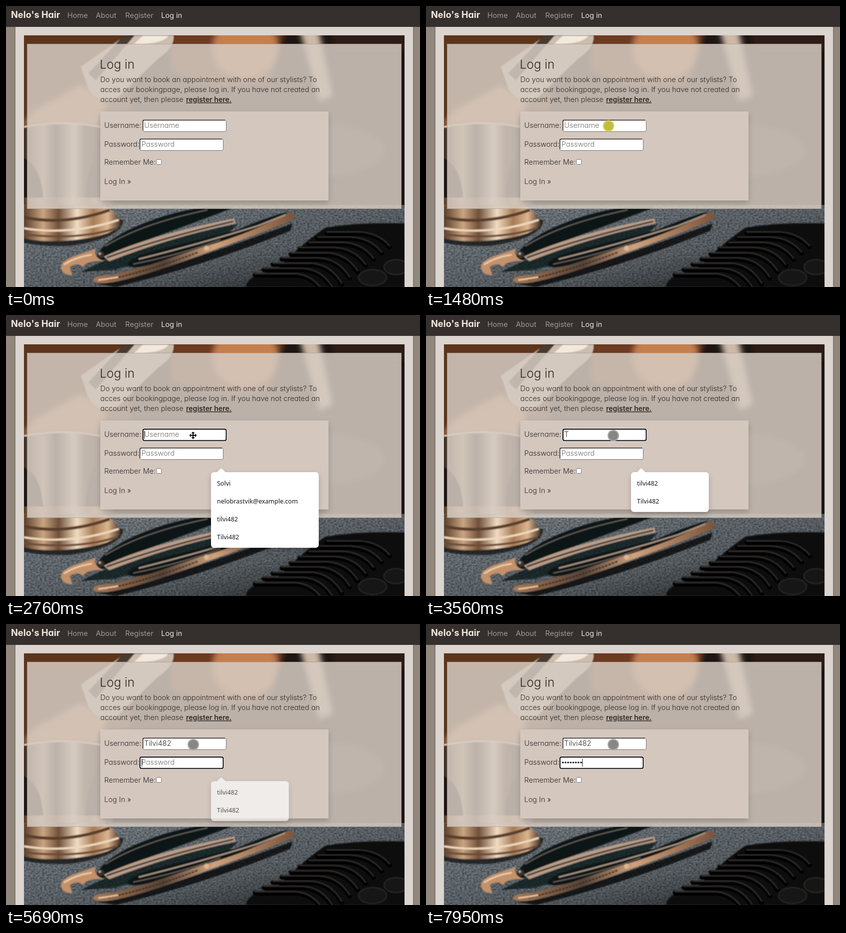
An HTML page for the animation above (8 s loop, 830 by 565 pixels).

```html
<!DOCTYPE html>
<html lang="en">
<head>
<meta charset="utf-8">
<title>Log in</title>
<style>
html, body { margin: 0; width: 100%; height: 100%; overflow: hidden; background: #91877c; }
svg { display: block; width: 100%; height: 100%; }
text { font: 300 14.5px Inter, "Open Sans", sans-serif; font-feature-settings: "cv11"; fill: #2f2926; white-space: pre; }
.nav { font-weight: 400; font-size: 14.6px; fill: #a09995; }
.nav.active { fill: #eee6e0; }
.brand { font-weight: 700; font-size: 18.2px; fill: #f1e8e1; }
.title { font-size: 24.4px; }
.link { font-weight: 600; font-size: 14.1px; text-decoration: underline; }
.hint { fill: #756d69; }
.popup text { font: 400 12.5px "Noto Sans", "Open Sans", sans-serif; fill: #15151f; }
</style>
</head>
<body>
<svg viewBox="0 0 830 565" preserveAspectRatio="none">
  <defs>
    <clipPath id="photoClip"><rect x="36" y="59" width="763" height="506"/></clipPath>
    <filter id="soft" x="-20%" y="-20%" width="140%" height="140%"><feGaussianBlur stdDeviation="6"/></filter>
    <filter id="slight" x="-10%" y="-10%" width="120%" height="120%"><feGaussianBlur stdDeviation="0.8"/></filter>
    <filter id="shadow" x="-10%" y="-10%" width="120%" height="130%">
      <feDropShadow dx="0" dy="5" stdDeviation="6" flood-color="#000" flood-opacity=".2"/>
    </filter>
    <filter id="towel" x="0" y="0" width="100%" height="100%">
      <feTurbulence type="fractalNoise" baseFrequency=".22 .3" numOctaves="3" seed="4"/>
      <feColorMatrix values=".3 0 0 0 .005  .32 0 0 0 .02  .34 0 0 0 .03  0 0 0 0 1"/>
    </filter>
    <linearGradient id="cup">
      <stop offset="0" stop-color="#3a2a22"/><stop offset=".25" stop-color="#b59a82"/>
      <stop offset=".42" stop-color="#2b211c"/><stop offset=".65" stop-color="#e0cdb8"/>
      <stop offset=".8" stop-color="#4c382c"/><stop offset="1" stop-color="#1d1714"/>
    </linearGradient>
    <linearGradient id="gold">
      <stop offset="0" stop-color="#5b3e2b"/><stop offset=".2" stop-color="#c9a582"/>
      <stop offset=".36" stop-color="#71503a"/><stop offset=".55" stop-color="#f0dcc2"/>
      <stop offset=".72" stop-color="#a67b58"/><stop offset=".87" stop-color="#dcb590"/>
      <stop offset="1" stop-color="#4a3527"/>
    </linearGradient>
    <linearGradient id="steel">
      <stop offset="0" stop-color="#a87955"/><stop offset=".35" stop-color="#554337"/>
      <stop offset=".6" stop-color="#d0a27c"/><stop offset="1" stop-color="#7b543b"/>
    </linearGradient>
    <linearGradient id="dusk" x1="0" x2="1" y1="0" y2="1">
      <stop offset="0" stop-color="#000" stop-opacity="0"/><stop offset=".6" stop-color="#000" stop-opacity=".25"/>
      <stop offset="1" stop-color="#000" stop-opacity=".8"/>
    </linearGradient>
  </defs>

  <rect width="830" height="565" fill="#91877c"/>
  <rect x="17" y="42" width="801" height="523" fill="#83786e"/>
  <rect x="19" y="42" width="797" height="523" fill="#dbd4cf"/>

  <g clip-path="url(#photoClip)">
    <rect x="36" y="59" width="763" height="506" fill="#1d1613"/>
    <g filter="url(#soft)">
      <path d="M20 45H250V215L20 250Z" fill="#5c341f"/>
      <path d="M330 45H560L530 150Q430 180 330 130Z" fill="#6d3a20"/>
      <ellipse cx="480" cy="85" rx="65" ry="60" fill="#c47f50"/>
      <path d="M588 45H626L655 180L628 192Z" fill="#cdb9a6"/>
      <path d="M650 45H810V90H660Z" fill="#2f1d13"/>
      <path d="M36 240L58 212L150 160L200 190L190 242Z" fill="#c48a62"/>
      <ellipse cx="600" cy="290" rx="160" ry="55" fill="#3a3634"/>
    </g>
    <g filter="url(#slight)">
      <path d="M150 122L240 59H336Q340 82 305 106L222 186Q186 200 165 166Z" fill="#ccbdad"/>
      <path d="M236 59H258L180 150L165 135Z" fill="#493a31"/>
      <path d="M275 59H326Q318 76 255 78Z" fill="#f2e8dc"/>
      <path d="M36 242Q115 228 190 242L183 300Q160 326 158 408H75Q76 326 36 306Z" fill="url(#cup)"/>
      <path d="M36 243Q115 228 190 243" fill="none" stroke="#f0dfcc" stroke-width="3"/>
      <path d="M36 385H215V410H36Z" fill="url(#gold)"/>
    </g>

    <rect x="36" y="400" width="763" height="165" filter="url(#towel)"/>
    <rect x="36" y="400" width="763" height="165" fill="url(#dusk)"/>
    <g filter="url(#slight)">
      <path d="M36 430H235Q235 466 130 482Q70 484 36 476Z" fill="#0d0e0f" opacity=".75"/>
      <path d="M36 400H196Q229 418 229 440Q212 464 122 472Q65 475 36 467Z" fill="url(#gold)"/>
      <path d="M36 425Q120 442 208 410" fill="none" stroke="#5a3e2c" stroke-width="6"/>
      <path d="M36 447Q130 462 226 430" fill="none" stroke="#f0d9bd" stroke-width="4"/>
      <path d="M36 459Q145 472 224 446" fill="none" stroke="#6d4b35" stroke-width="4"/>

      <path d="M150 535Q250 480 465 438L440 462L220 530Z" fill="#090b0c" opacity=".7"/>
      <path d="M181 505Q186 483 240 453Q320 414 400 405H458Q370 438 300 464Q235 490 207 508Q190 514 181 505Z" fill="#0f1214"/>
      <path d="M199 483Q270 438 404 410" fill="none" stroke="#6c6560" stroke-width="2"/>
      <path d="M196 504Q290 460 458 427L460 437Q330 465 207 513Z" fill="#b99d88"/>
      <path d="M202 506Q310 467 456 433" fill="none" stroke="#342d2a" stroke-width="3"/>
      <path d="M110 526Q110 511 142 501L180 488Q174 504 195 513Q163 511 154 525Q145 514 128 525L133 541Q113 542 110 526Z" fill="#c3916b"/>
      <path d="M116 520Q139 505 172 500" fill="none" stroke="#f0cfaf" stroke-width="3"/>
      <circle cx="190" cy="500" r="7" fill="#34302e"/><circle cx="188" cy="498" r="2.5" fill="#c0a791"/>

      <path d="M180 558Q300 540 575 437L570 452Q390 525 220 565Z" fill="#070809" opacity=".75"/>
      <path d="M174 551Q178 540 214 541Q290 520 390 484L566 416Q579 413 578 427Q560 439 410 493Q285 541 220 554Q181 562 174 551Z" fill="url(#steel)"/>
      <path d="M242 521Q248 506 300 492L462 451Q525 424 568 413Q500 455 390 486L290 520Q254 530 242 521Z" fill="#101315"/>
      <path d="M266 509Q390 478 505 442L560 420" fill="none" stroke="#a89483" stroke-width="3"/>
      <path d="M255 519Q350 500 430 470" fill="none" stroke="#6d625b" stroke-width="2"/>
      <path d="M205 550Q290 532 385 495" fill="none" stroke="#3a2a20" stroke-width="3" stroke-dasharray="5 2"/>
      <path d="M185 551Q210 548 225 545" fill="none" stroke="#f0c9a4" stroke-width="3"/>
      <circle cx="402" cy="487" r="5" fill="#dfb893"/>

      <path d="M640 446Q700 435 799 437V565H482Q478 545 545 528Q590 480 640 446Z" fill="#080808"/>
      <g id="teeth" fill="none" stroke-linecap="round"></g>
      <ellipse cx="735" cy="546" rx="28" ry="16" fill="#131313" stroke="#2d2b2a" stroke-width="2"/>
      <ellipse cx="782" cy="525" rx="24" ry="15" fill="#141414" stroke="#2d2b2a" stroke-width="2"/>
    </g>
  </g>

  <rect x="42.5" y="76.5" width="750" height="331" fill="#d6cbc2" fill-opacity=".86" stroke="#aaa097" stroke-opacity=".8"/>
  <rect x="189" y="212" width="457.5" height="179" fill="#d4c7be" filter="url(#shadow)"/>

  <rect width="830" height="42" fill="#352f2d"/>
  <text class="brand" x="10" y="24">Nelo's Hair</text>
  <text class="nav" x="123" y="23.5">Home</text>
  <text class="nav" x="180" y="23.5">About</text>
  <text class="nav" x="239" y="23.5">Register</text>
  <text class="nav active" x="311" y="23.5">Log in</text>

  <text class="title" x="188" y="126">Log in</text>
  <text x="189" y="153">Do you want to book an appointment with one of our stylists? To</text>
  <text x="189" y="173">acces our bookingpage, please log in. If you have not created an</text>
  <text x="189" y="193">account yet, then please</text>
  <text class="link" x="361" y="193">register here.</text>

  <text x="197" y="245">Username:</text>
  <text x="197" y="283">Password:</text>
  <text x="197" y="319">Remember Me:</text>
  <text x="197" y="358">Log In »</text>
  <rect x="301.5" y="308.5" width="10" height="10" rx="2" fill="#fff" stroke="#767676"/>

  <g id="fields" fill="none"></g>
  <text id="username" x="277" y="245"></text>
  <text id="hint" class="hint" x="271.5" y="283">Password</text>
  <g id="dots" fill="#1c1818"></g>
  <rect id="caret" width="1" height="16" fill="#222"/>

  <g id="popup" class="popup">
    <g filter="url(#shadow)" fill="#fff">
      <rect id="popupBox" x="411" y="316" rx="6"/>
      <path d="M422 317L431.5 308L441 317Z"/>
    </g>
    <g id="choices"></g>
  </g>

  <g id="pointer">
    <circle id="halo" r="11.5"/><circle id="disc" r="9.3"/>
  </g>
  <path id="cross" transform="translate(375 242)" fill="#000" stroke="#fff" stroke-width="1" paint-order="stroke"
    d="M0-7.5L3.5-4H1V-1H4V-3.5L7.5 0L4 3.5V1H1V4H3.5L0 7.5L-3.5 4H-1V1H-4V3.5L-7.5 0L-4-3.5V-1H-1V-4H-3.5Z"/>
</svg>

<script>
const LOOP = 8000, BLINK = 530;
const NAME = "Tilvi482";
const NAME_KEYS = [3030, 3630, 3820, 4040, 4100, 4960, 5090, 5420];
const PASS_KEYS = [6290, 6490, 6760, 6890, 7020, 7650, 7750, 7950];
const FOCUS = 1890, TAB = 5620;

const $ = id => document.getElementById(id);
const clamp = v => Math.max(0, Math.min(1, v));
const show = (el, on) => el.style.visibility = on ? "visible" : "hidden";
const set = (el, attrs) => { for (const k in attrs) el.setAttribute(k, attrs[k]); };
const typed = (keys, t) => keys.filter(k => k <= t).length;

// Clipper guard teeth
for (let i = 0; i < 9; i++) {
  const d = `M${643 - i * 18} ${457 + i * 10.5}h${64 + i * 2}q40 2 62 ${28 + i * 2}`;
  $("teeth").innerHTML += `<path d="${d}" stroke="#050505" stroke-width="9"/>
    <path d="${d}" transform="translate(0 -3)" stroke="#383634" stroke-width="2"/>`;
}

const fieldSvg = (x, y) => `
  <rect x="${x + .5}" y="${y + .5}" width="167" height="23" rx="3" fill="#fff" stroke="#767070"/>
  <path d="M${x + .5} ${y + 21}v-18q0-2.5 2.5-2.5h162" stroke="#2a2424" stroke-width="1.5"/>
  <g><rect x="${x - 1}" y="${y - 1}" width="170" height="26" rx="4" stroke="#fff"/>
  <rect x="${x + .5}" y="${y + .5}" width="167" height="23" rx="3" stroke="#101014" stroke-width="2"/></g>`;
$("fields").innerHTML = `<g>${fieldSvg(274, 229)}</g><g>${fieldSvg(268, 267)}</g>`;
const [nameRing, passRing] = document.querySelectorAll("#fields > g > g");

$("dots").innerHTML = PASS_KEYS.map((_, i) =>
  `<circle cx="${274.5 + i * 5.2}" cy="278.5" r="1.8"/>`).join("");

const login = [NAME.toLowerCase(), NAME];
const choiceSvg = list => list.map((s, i) => `<text x="423" y="${343 + i * 36}">${s}</text>`).join("");
const allChoices = choiceSvg(["Solvi", "nelobrastvik@example.com", ...login]);
const fewChoices = choiceSvg(login);
let shownChoices = "";

function drawPopup(t) {
  const narrow = t >= NAME_KEYS[0];
  const choices = narrow ? fewChoices : allChoices;
  if (choices !== shownChoices) $("choices").innerHTML = shownChoices = choices;
  set($("popupBox"), { width: narrow ? 156 : 216, height: narrow ? 80 : 152 });
  const opacity = clamp((t - 1480) / 270) * clamp((5830 - t) / 210);
  $("popup").style.opacity = opacity;
}

function drawFields(t) {
  const nameLength = typed(NAME_KEYS, t), passLength = typed(PASS_KEYS, t);
  const inPassword = t >= TAB;
  const name = $("username");
  name.textContent = nameLength ? NAME.slice(0, nameLength) : "Username";
  name.setAttribute("class", nameLength ? "" : "hint");
  show($("hint"), !passLength);
  [...$("dots").children].forEach((dot, i) => show(dot, i < passLength));
  show(nameRing, t >= FOCUS && !inPassword);
  show(passRing, inPassword);

  const lastKey = [1630, ...NAME_KEYS, TAB, ...PASS_KEYS].filter(k => k <= t).pop();
  const x = inPassword ? 271.5 + passLength * 5.2
    : 277 + (nameLength ? name.getComputedTextLength() : 0);
  set($("caret"), { x: Math.round(x), y: inPassword ? 271 : 233 });
  show($("caret"), t >= FOCUS && (t - lastKey) % (2 * BLINK) < BLINK);
}

function drawPointer(t) {
  const p = clamp(Math.floor((t - 260) / 68.8) / 9);
  const e = p * p * (3 - 2 * p), bend = 4 * e * (1 - e);
  const x = t < FOCUS ? 708 - 342 * e : 375.5;
  const y = t < FOCUS ? 463 - 222 * e - 14 * bend : 242.5;
  const pressed = t >= 1480 && t < 1750;
  const moveCursor = t >= 2760 && t < 3230;
  set($("pointer"), { transform: `translate(${x} ${y})` });
  set($("halo"), { fill: pressed ? "#d9d85f" : "#a9a7a5" });
  set($("disc"), { fill: pressed ? "#c1bc3e" : "#878686" });
  show($("pointer"), t >= 260 && !moveCursor);
  show($("cross"), moveCursor);
}

function frame() {
  const t = performance.now() % LOOP;
  drawFields(t);
  drawPopup(t);
  drawPointer(t);
  requestAnimationFrame(frame);
}
frame();
</script>
</body>
</html>
```
